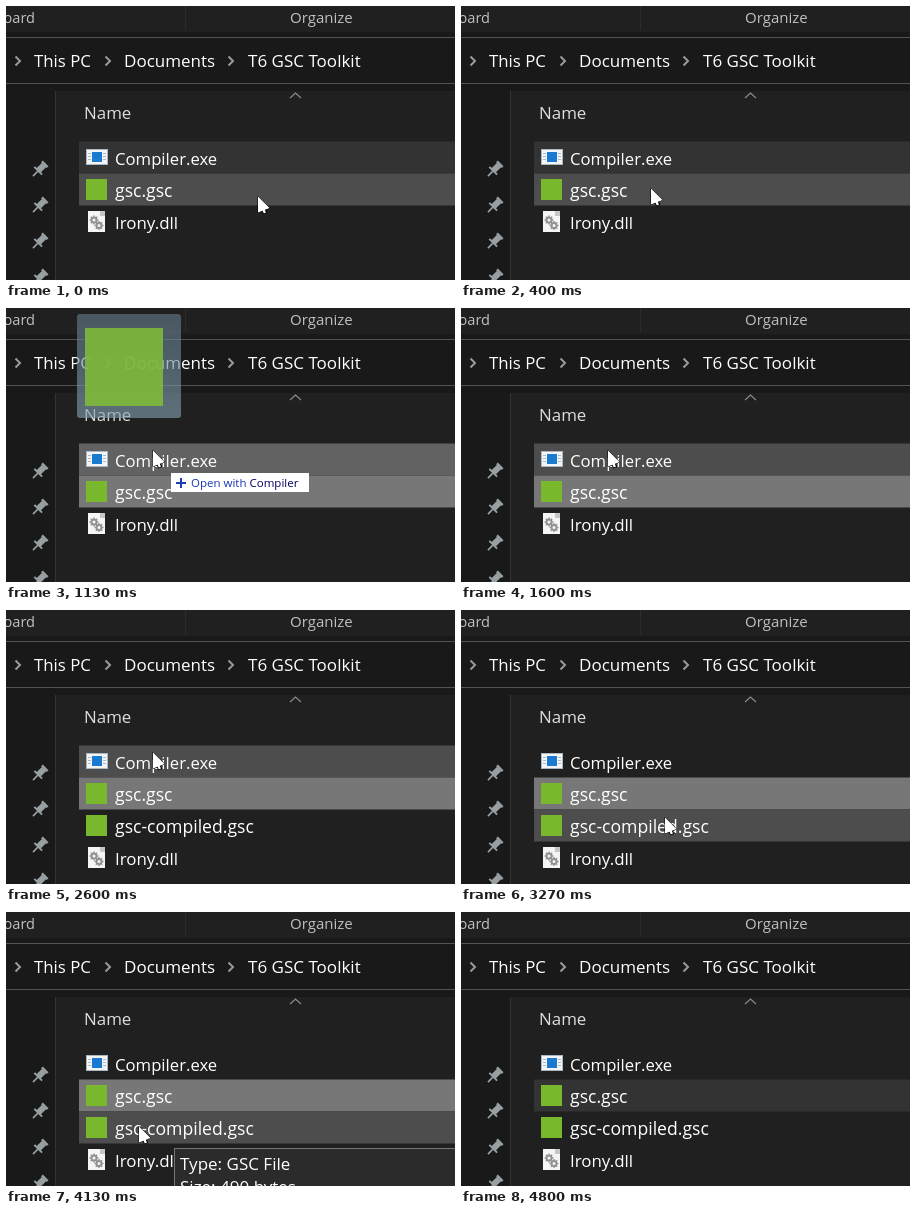
Recreate the animation shown at these times as an HTML page with a canvas. Size 449 by 274 pixels, loop 4.87 s.

```html
<!DOCTYPE html>
<html lang="en">
<head>
<meta charset="utf-8">
<title>File list</title>
<style>
html, body { margin: 0; width: 100%; height: 100%; overflow: hidden; background: #191919; }
canvas { display: block; width: 449px; height: 274px; }
</style>
</head>
<body>
<canvas id="stage" width="449" height="274"></canvas>
<script>
const ctx = document.getElementById('stage').getContext('2d');
const LOOP = 4870, STEP = 1000 / 15;
const ROW_TOP = 136, ROW_H = 32, LIST_X = 73;
const HOVER = '#4d4d4d', SELECTED = '#777777', INACTIVE = '#333333', DROP = '#626262';

// Steps at which the state changes
const PRESS = 7, LIFT = 10, OVER_TARGET = 11, ICON_READY = 16, RELEASE = 21, DROPPED = 24;
const COMPILED = 39, TIP_ON = 61, TIP_OFF = 66, BLUR = 72;

// Pointer stops: step, x, y
const stops = [
  [0, 252, 190], [8, 178, 181], [12, 163, 158], [14, 151, 136], [17, 147, 142], [42, 147, 142],
  [49, 204, 207], [54, 245, 219], [58, 110, 218], [62, 133, 214], [66, 86, 224], [67, 36, 246]
];

const ease = k => k * k * (3 - 2 * k);

function pointerAt(n) {
  const i = stops.findIndex(s => s[0] > n);
  if (i < 0) return n === stops.at(-1)[0] ? { x: stops.at(-1)[1], y: stops.at(-1)[2] } : null;
  const [n0, x0, y0] = stops[i - 1], [n1, x1, y1] = stops[i];
  const k = ease((n - n0) / (n1 - n0));
  return { x: Math.round(x0 + (x1 - x0) * k), y: Math.round(y0 + (y1 - y0) * k) };
}

function rect(x, y, w, h, color) {
  ctx.fillStyle = color;
  ctx.fillRect(x, y, w, h);
}

function frame(x, y, w, h, color) {
  ctx.lineWidth = 1;
  ctx.strokeStyle = color;
  ctx.strokeRect(x + 0.5, y + 0.5, w - 1, h - 1);
}

function text(str, x, y, size, color = '#ffffff', align = 'left') {
  ctx.font = size + 'px "Open Sans", "Noto Sans", sans-serif';
  ctx.textAlign = align;
  ctx.fillStyle = color;
  ctx.fillText(str, x, y);
}

function line(points, color, width) {
  ctx.beginPath();
  points.forEach(([x, y]) => ctx.lineTo(x, y));
  ctx.strokeStyle = color;
  ctx.lineWidth = width;
  ctx.stroke();
}

function pin(x, y) {
  const bar = (w, top, h) => rect(-w / 2, top, w, h, '#98a0a3');
  ctx.save();
  ctx.translate(x, y);
  ctx.rotate(Math.PI / 4);
  bar(8, -8, 2.5);
  bar(6, -6, 8);
  bar(11, 1.5, 2);
  bar(1.6, 3, 7);
  ctx.restore();
}

function gear(x, y) {
  const r = 2.5, teeth = 8;
  ctx.beginPath();
  ctx.arc(x, y, r, 0, 2 * Math.PI);
  ctx.strokeStyle = '#929292';
  ctx.lineWidth = 2;
  ctx.stroke();
  for (let i = 0; i < teeth; i++) {
    const a = i * 2 * Math.PI / teeth;
    const spoke = d => [x + Math.cos(a) * d, y + Math.sin(a) * d];
    line([spoke(r), spoke(r + 2)], '#929292', 1.4);
  }
}

const icons = {
  exe(y) {
    rect(80, y + 7, 22, 16, '#f4f4f4');
    frame(80, y + 7, 22, 16, '#a9b7c2');
    rect(86, y + 10, 10, 10, '#1a7ad0');
    for (let i = 0; i < 3; i++) {
      [82, 97].forEach(x => rect(x, y + 11 + i * 3, 3, 1, '#a8bdcc'));
    }
  },
  gsc(y) {
    rect(80, y + 5, 21, 21, '#79b82c');
  },
  dll(y) {
    rect(82, y + 5, 17, 21, '#f5f5f5');
    rect(94, y + 5, 5, 5, '#c6c6c6');
    gear(88, y + 14);
    gear(93, y + 19.5);
  }
};

function chrome() {
  rect(0, 0, 449, 274, '#191919');
  rect(0, 0, 449, 26, '#202020');
  rect(179, 0, 1, 24, '#2c2c2c');
  text('Clipboard', 29, 17, 14.6, '#c0c0c0', 'right');
  text('Organize', 284, 17, 15, '#c0c0c0');
  [31, 77].forEach(y => rect(0, y, 449, 1, '#535353'));
  rect(50, 85, 399, 189, '#202020');
  rect(49, 85, 1, 189, '#333333');
  [9, 99, 222].forEach(x => line([[x + 0.5, 50.5], [x + 5, 55], [x + 0.5, 59.5]], '#9a9a9a', 2));
  text('This PC', 28, 61, 16.8);
  text('Documents', 118, 61, 17);
  text('T6 GSC Toolkit', 242, 61, 17);
  line([[284, 92], [289.5, 87], [295, 92]], '#8c8c8c', 1.1);
  text('Name', 78, 113, 16.9, '#dedede');
  for (let y = 163; y < 274; y += 36) pin(34, y);
}

function rowFills(n, p) {
  if (n < PRESS) return [INACTIVE, HOVER];
  const fills = [null, n < BLUR ? SELECTED : INACTIVE];
  if (n >= OVER_TARGET && n <= RELEASE) fills[0] = DROP;
  else if (n > RELEASE && p && p.x >= LIST_X) {
    const row = Math.floor((p.y - ROW_TOP) / ROW_H);
    if (row !== 1) fills[row] = HOVER;
  }
  return fills;
}

function list(n, p) {
  const files = [['Compiler.exe', 16.7], ['gsc.gsc', 17.6], ['Irony.dll', 16.9]];
  if (n >= COMPILED) files.splice(2, 0, ['gsc-compiled.gsc', 17.6]);
  const fills = rowFills(n, p);
  files.forEach(([name, size], i) => {
    const y = ROW_TOP + i * ROW_H;
    if (fills[i]) rect(LIST_X, y - 0.5, 376, ROW_H, fills[i]);
    icons[name.split('.')[1]](y);
    text(name, 109, y + 23, size);
  });
}

function dragImage(n, p) {
  if (n < LIFT || n >= DROPPED) return;
  const x = p.x - 76, y = p.y - 136;
  ctx.save();
  ctx.globalAlpha = n < RELEASE ? 1 : (DROPPED - n) / 5;
  const glass = ctx.createLinearGradient(0, y, 0, y + 104);
  glass.addColorStop(0, 'rgba(98,122,136,.62)');
  glass.addColorStop(1, 'rgba(130,160,176,.62)');
  ctx.fillStyle = glass;
  ctx.beginPath();
  ctx.roundRect(x, y, 104, 104, 3);
  ctx.fill();
  if (n >= ICON_READY) rect(x + 8, y + 14, 78, 78, 'rgba(128,188,56,.88)');
  ctx.restore();
}

function dropLabel(n, p) {
  if (n < OVER_TARGET || n >= RELEASE) return;
  const x = p.x + 18, y = p.y + 23, lead = 'Open with ';
  rect(x, y, 138, 19, '#ffffff');
  rect(x + 5, y + 9, 10, 2, '#1c3cb8');
  rect(x + 9, y + 5, 2, 10, '#1c3cb8');
  text(lead, x + 20, y + 13.5, 11.5, '#1a36b8');
  text('Compiler', x + 20 + ctx.measureText(lead).width, y + 13.5, 11.5, '#000060');
}

function infoTip(n) {
  if (n < TIP_ON || n >= TIP_OFF) return;
  ctx.save();
  ctx.globalAlpha = n === TIP_ON ? 0.5 : 1;
  rect(168, 236, 290, 60, '#2b2b2b');
  frame(168, 236, 290, 60, '#767676');
  text('Type: GSC File', 174, 258, 17);
  text('Size: 490 bytes', 174, 281, 17);
  ctx.restore();
}

function pointer(p) {
  if (!p) return;
  const head = new Path2D('M0 0V16L11.5 11.5Z');
  const tail = [[4, 10], [7.3, 17.2]];
  ctx.save();
  ctx.translate(p.x, p.y + 0.5);
  ctx.lineWidth = 1;
  ctx.strokeStyle = '#000000';
  ctx.stroke(head);
  line(tail, '#000000', 4.4);
  ctx.fillStyle = '#ffffff';
  ctx.fill(head);
  line([tail[0], [6.9, 16.4]], '#ffffff', 2.4);
  ctx.restore();
}

function draw(ms) {
  const n = Math.floor((ms % LOOP + 4) / STEP);
  const p = pointerAt(n);
  chrome();
  list(n, p);
  dragImage(n, p);
  dropLabel(n, p);
  infoTip(n);
  pointer(p);
}

let start;
function tick(now) {
  start ??= now;
  draw(now - start);
  requestAnimationFrame(tick);
}
draw(0);
requestAnimationFrame(tick);
</script>
</body>
</html>
```
